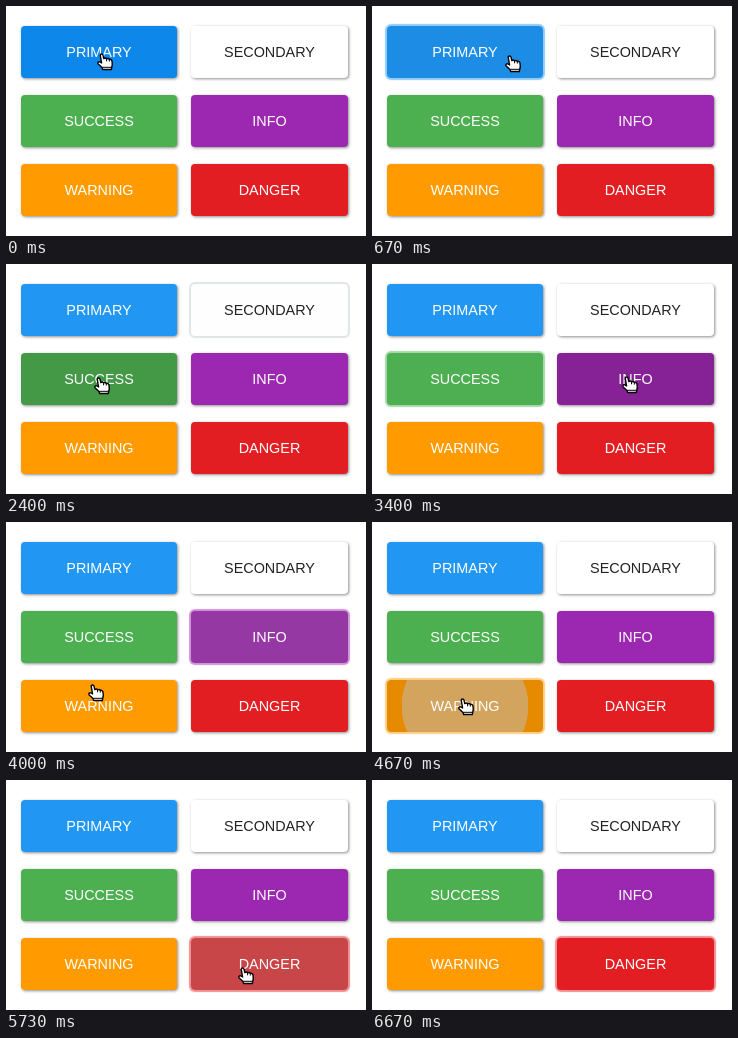
These frames come from a looping animation (360x230 px, 6.99 s). An HTML page:

```html
<!DOCTYPE html>
<html lang="en">
<head>
<meta charset="utf-8">
<title>Ripple buttons</title>
<style>
  html, body { margin: 0; width: 100%; height: 100%; overflow: hidden; background: #fff; }
  #stage { position: relative; width: 360px; height: 230px; overflow: hidden; }
  .button {
    position: absolute; height: 52px; border-radius: 4px;
    font: 14.4px/52px "Liberation Sans", Arial, sans-serif;
    text-align: center; white-space: nowrap; color: #fff;
  }
  #cursor { position: absolute; left: 0; top: 0; overflow: visible; }
</style>
</head>
<body>
<div id="stage"></div>
<script>
const LOOP = 6990, FRAME = 1000 / 15, FADE = 800;
const ACTIVE = [189, 189, 189];
const REST_SHADOW = "1px 1px 3px rgba(0,0,0,.45)";

// Times in ms: pointer enters, presses, releases and leaves each button.
const buttons = [
  { label: "PRIMARY", base: [33, 150, 243], hover: [13, 135, 233], times: [-1000, 110, 150, 740] },
  { label: "SECONDARY", base: [255, 255, 255], hover: [239, 239, 239], times: [770, 1440, 1480, 1780],
    text: "#222", ring: [196, 202, 204] },
  { label: "SUCCESS", base: [76, 175, 80], hover: [66, 152, 69], times: [1850, 2450, 2490, 2800] },
  { label: "INFO", base: [156, 39, 176], hover: [134, 33, 148], times: [2830, 3410, 3430, 3820] },
  { label: "WARNING", base: [255, 155, 0], hover: [230, 139, 0], times: [3970, 4390, 4430, 4900] },
  { label: "DANGER", base: [227, 30, 34], hover: [204, 26, 30], times: [4920, 5340, 5380, 5770] }
];

// Pointer moves: start, end, x, y.
const moves = [
  [500, 960, 231, 53],
  [1630, 2050, 88, 113],
  [2700, 2950, 250, 112],
  [3680, 4000, 82, 162],
  [4000, 4130, 86, 176],
  [4750, 5000, 216, 186],
  [5000, 5080, 232, 187]
];
const CURSOR_START = [91, 47], CURSOR_GONE = 5780;

const clamp = v => Math.min(1, Math.max(0, v));
const lerp = (a, b, k) => a + (b - a) * k;
const mix = (a, b, k) => a.map((v, i) => lerp(v, b[i], k));
const rgb = (c, alpha = 1) => `rgba(${c.map(Math.round).join()},${alpha})`;
const smooth = k => k * k * (3 - 2 * k);

// The CSS "ease" curve: cubic-bezier(.25, .1, .25, 1).
function ease(k) {
  k = clamp(k);
  const bezier = (a, b, s) => 3 * a * s * (1 - s) ** 2 + 3 * b * s * s * (1 - s) + s ** 3;
  let low = 0, high = 1;
  for (let i = 0; i < 20; i++) {
    const mid = (low + high) / 2;
    if (bezier(.25, .25, mid) < k) low = mid; else high = mid;
  }
  return bezier(.1, 1, low);
}

const stage = document.getElementById("stage");
buttons.forEach((button, i) => {
  const el = button.el = document.createElement("div");
  const right = i % 2;
  el.className = "button";
  el.textContent = button.label;
  el.style.left = (right ? 185 : 15) + "px";
  el.style.top = 20 + 69 * Math.floor(i / 2) + "px";
  el.style.width = (right ? 157 : 156) + "px";
  if (button.text) el.style.color = button.text;
  stage.append(el);
});
stage.insertAdjacentHTML("beforeend", `
  <svg id="cursor" width="17" height="18" stroke="#000" stroke-width="1.4" stroke-linejoin="round">
    <path fill="#fff" d="M3.2 2.2C3.2.6 5.6.6 6 2.2L6.8 5.6C8 4.8 9 5 9.6 5.8 10.8 5.2 11.8 5.4 12.3 6.3
      13.6 6 14.8 6.8 15 8.2L15.3 11.5 14.3 16.5H5.5L5.3 14.8 1.2 11C0 9.6 1.6 8.2 3 9L4.6 10Z"/>
    <path fill="none" stroke-width="1" d="M5.5 14.3H14.4M9.6 6V8.3M12.3 6.5V8.6"/>
  </svg>`);
const cursor = document.getElementById("cursor");

function background({ base, hover, times: [enter, press, release, leave] }, t) {
  if (t < press) return rgb(mix(base, hover, ease((t - enter) / FADE)));
  const grown = ease((Math.min(t, leave) - release) / FADE);
  const inner = mix(ACTIVE, hover, grown);
  if (t >= leave) return rgb(mix(inner, base, ease((t - leave) / FADE)));
  const radius = .827 * lerp(1, 150, grown);
  return `radial-gradient(circle, ${rgb(inner)} ${radius}px, ${rgb(hover)} ${radius + .5}px)`;
}

function draw(t) {
  buttons.forEach((button, i) => {
    const next = buttons[i + 1];
    const focused = t >= button.times[1] && (!next || t < next.times[1]);
    button.el.style.background = background(button, t);
    button.el.style.boxShadow = focused
      ? `0 0 1px 2px ${rgb(button.ring || button.base, .5)}` : REST_SHADOW;
  });

  let [x, y] = CURSOR_START;
  for (const [start, end, toX, toY] of moves) {
    const k = smooth(clamp((t - start) / (end - start)));
    x = lerp(x, toX, k);
    y = lerp(y, toY, k);
  }
  cursor.style.transform = `translate(${Math.round(x)}px,${Math.round(y)}px)`;
  cursor.style.display = t < CURSOR_GONE ? "" : "none";
}

const startTime = performance.now();
function tick() {
  const t = (performance.now() - startTime) % LOOP;
  draw(Math.floor((t + 5) / FRAME) * FRAME);
  requestAnimationFrame(tick);
}
tick();
</script>
</body>
</html>
```
